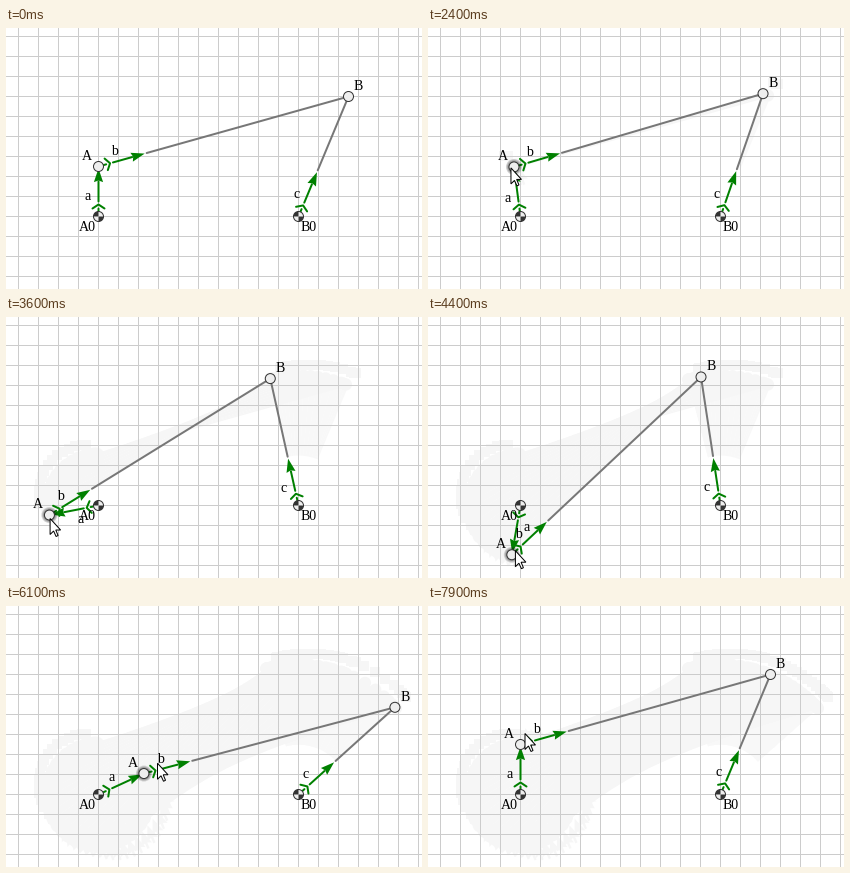
A matplotlib script that plays this animation: 416x261 px, repeating every 8000 ms.

```python
import numpy as np
import matplotlib.pyplot as plt
from matplotlib.animation import FuncAnimation
from matplotlib.patches import Circle, Polygon, Rectangle, Wedge

W, H, DPI = 416, 261, 64
PX = 72 / DPI                      # one pixel in points
STEP, FRAMES = 100, 80
A0, B0 = np.array([92.5, 188.5]), np.array([292.5, 188.5])
CRANK, COUPLER, ROCKER = 50, np.hypot(250, 70), 130
GREEN, GREY, DARK = "#008000", "#777777", "#333333"
ENTER, HOVER, GRAB, DROP = 6, 14, 21, 72    # steps of the pointer's actions


def polar(deg, r):
    w = np.radians(deg)
    return r * np.array([np.cos(w), -np.sin(w)])


def heading(p, q):
    return np.degrees(np.arctan2(p[1] - q[1], q[0] - p[0]))


def crank_angle(n):
    """One hand-dragged turn at a slightly uneven pace."""
    return np.interp(n, [GRAB, 24, 36, 44, 55, 68, DROP],
                     [90, 97.5, 191, 260, 349, 426.5, 450])


def linkage(n):
    """Crank end A and coupler end B at step n."""
    a = A0 + polar(crank_angle(n), CRANK)
    d = np.hypot(*(B0 - a))
    turn = np.arccos((COUPLER**2 + d**2 - ROCKER**2) / (2 * COUPLER * d))
    return a, a + polar(heading(a, B0) + np.degrees(turn), COUPLER)


def pointer(n):
    if n <= HOVER:
        s = 1 - (1 - (n - ENTER) / (HOVER - ENTER)) ** 1.6
        return np.array([180 - 83 * s, 45 + 91 * s])
    if n <= GRAB:
        s = min((n - HOVER) / 2, 1)
        return np.array([97 - 5 * s, 136 + 5 * s])
    if n <= DROP:
        lead = np.interp(n, [GRAB, 24, 66, DROP], [0, 3.5, 3.5, -4])
        reach = np.interp(n, [36, 44, 58], [50, 45, 67])
        return A0 + polar(crank_angle(n) + lead, reach)
    return np.array([97, np.interp(n, [FRAMES - 3, FRAMES - 1], [122, 127])])


fig = plt.figure(figsize=(W / DPI, H / DPI), dpi=DPI, facecolor="white")
ax = fig.add_axes([0, 0, 1, 1])
ax.set(xlim=(0, W), ylim=(H, 0))
ax.axis("off")

grid = dict(color="#cccccc", lw=PX, zorder=1, snap=False)
for x in np.arange(12.5, W, 20):
    ax.plot([x, x], [0, H], **grid)
for y in np.arange(8.5, H, 20):
    ax.plot([0, W], [y, y], **grid)


def label(s, z):
    return ax.text(0, 0, s, family="Liberation Serif", size=14 * PX,
                   ha="center", va="baseline", color="black", zorder=z)


def put(text, p):
    text.set_position((p[0] - .6, p[1] + 4))


class Vector:
    """Link drawn as a grey bar with a green arrow at its start."""
    SHAFT = np.array([[0, 0], [8, 0], [np.nan] * 2, [8, 6], [12, 0], [8, -6],
                      [np.nan] * 2, [15, 0], [35, 0]])
    HEAD = np.array([[48, 0], [34.4, -4.6], [36, 0], [34.4, 4.6]])

    def __init__(self, name):
        line = dict(lw=2 * PX, solid_capstyle="round")
        self.bar, = ax.plot([], [], color=GREY, zorder=4, **line)
        self.shaft, = ax.plot([], [], color=GREEN, zorder=5, **line)
        self.head = ax.add_patch(Polygon(self.HEAD, fc=GREEN, lw=0, zorder=5))
        self.name = label(name, 6)

    def place(self, p, q, size):
        w = heading(p, q)
        u, v = polar(w, 1), polar(w + 90, 1)
        at = lambda pts: p + pts[:, :1] * u + pts[:, 1:] * v
        if size > 50:
            self.bar.set_data(*at(np.array([[50, 0], [size, 0]])).T)
        self.shaft.set_data(*at(self.SHAFT).T)
        self.head.set_xy(at(self.HEAD))
        put(self.name, p + 20 * u + 10 * v)


def node(p):
    return ax.add_patch(Circle(p, 5, fc="#eeeeee", ec=DARK, lw=PX, zorder=8))


for base, name, side in ((A0, "A0", -1), (B0, "B0", 1)):
    node(base)
    for start in (0, 180):
        ax.add_patch(Wedge(base, 5, start, start + 90, fc=DARK, lw=0, zorder=9))
    put(label(name, 9), base + 10.6 * np.array([side, 1]))

vec_a, vec_b, vec_c = (Vector(s) for s in "abc")
node_a, node_b = node(A0), node(B0)
name_a, name_b = label("A", 9), label("B", 9)
glow = [ax.add_patch(Circle(A0, r, fc="black", alpha=.14, lw=0, zorder=7))
        for r in (6.3, 7.1, 8)]
bar_glow, = ax.plot([], [], color="black", alpha=.16, lw=5 * PX, zorder=3)

ARROW = np.array([[0, .5], [0, 16.5], [3.5, 13], [6, 18.5], [8, 17.5],
                  [5.7, 12], [10.5, 12]])
cursor = ax.add_patch(Polygon(ARROW, fc="white", ec="black", lw=PX, zorder=20))


def swept(n):
    """Pale traces of the area crossed on the way to step n."""
    (a, b), (a2, b2) = linkage(n - 1), linkage(n)
    c, c2 = (B0 + (q - B0) * 50 / ROCKER for q in (b, b2))
    parts = [Polygon([c, b, b2, c2]), Polygon([a, b, b2, a2]),
             Circle(a2, 8), Circle(b2, 6),
             Rectangle(a2 + [-15, -16], 10, 10),
             Rectangle(b2 + [5, -16], 10, 10),
             Polygon(ARROW + pointer(n))]
    for p in parts:
        p.set(fc="#f6f6f6", lw=0, zorder=.5)
        ax.add_patch(p)
    parts[0].set(fc="#f8f8f8", zorder=.3)
    return parts


trail = {n: swept(n) for n in range(GRAB + 1, DROP + 1)}


def draw(n):
    a, b = linkage(n)
    vec_a.place(A0, a, CRANK)
    vec_b.place(a, b, COUPLER)
    vec_c.place(B0, b, ROCKER)
    node_a.center, node_b.center = a, b
    put(name_a, a + [-10.6, -10.6])
    put(name_b, b + [10.6, -10.6])
    for g in glow:
        g.center = a
        g.set_visible(HOVER < n < FRAMES - 2)
    bar_glow.set_data([a[0], b[0]], [a[1], b[1]])
    bar_glow.set_visible(n == HOVER)
    cursor.set_visible(n >= ENTER)
    if n >= ENTER:
        cursor.set_xy(ARROW + pointer(n))
    for k, parts in trail.items():
        for p in parts:
            p.set_visible(k <= n)
    return []


anim = FuncAnimation(fig, draw, frames=FRAMES, interval=STEP,
                     init_func=lambda: draw(0), repeat=True, repeat_delay=0)
plt.show()
```
